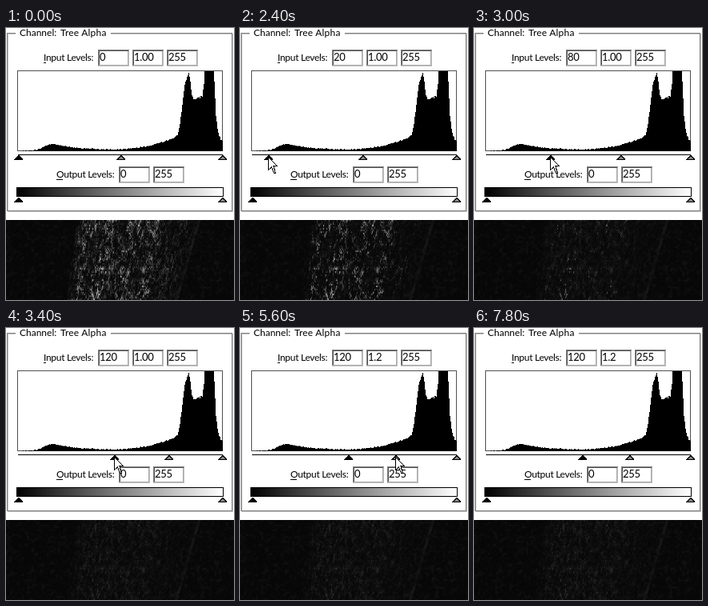
These frames come from a looping animation (285 px wide and 340 px high, 9.8 s). An HTML page with a canvas:

```html
<!DOCTYPE html>
<html lang="en">
<head>
<meta charset="utf-8">
<title>Levels</title>
<style>
html, body { margin: 0; width: 285px; height: 340px; overflow: hidden; background: #fff; }
svg { position: absolute; left: 0; top: 0; }
canvas { position: absolute; left: 0; top: 240px; }
text { font: 12px Lato, "Open Sans", sans-serif; fill: #000; }
#fields text { font-size: 13px; letter-spacing: -.3px; }
.crisp { shape-rendering: crispEdges; }
</style>
</head>
<body>
<canvas id="photo" width="285" height="100"></canvas>
<svg id="panel" width="285" height="340" viewBox="0 0 285 340">
  <defs>
    <linearGradient id="ramp"><stop stop-color="#000"/><stop offset="1" stop-color="#fff"/></linearGradient>
  </defs>
  <g class="crisp" fill="none">
    <path d="M12 7.5H2.5V229.5H283.5V7.5H131" stroke="#c0c0c0"/>
    <path d="M12 6.5H1.5V228.5H282.5V6.5H131" stroke="#808080"/>
  </g>
  <text x="17" y="10">Channel:</text>
  <text x="68" y="10" letter-spacing=".2">Tree Alpha</text>
  <text x="47" y="41" letter-spacing="-.3">Input Levels:</text>
  <text x="63" y="187" letter-spacing="-.3">Output Levels:</text>
  <path class="crisp" d="M47 43.5h3M63 189.5h8" stroke="#000"/>
  <g id="fields" class="crisp"></g>
  <g class="crisp">
    <rect x="14.5" y="53.5" width="256" height="100" fill="#fff" stroke="#505050"/>
    <path id="histogram" fill="#000"/>
    <path d="M15 158.5H271" stroke="#000"/>
    <rect x="13.5" y="199.5" width="258" height="11" fill="url(#ramp)" stroke="#000"/>
  </g>
  <g id="sliders" class="crisp"></g>
  <path id="cursor" class="crisp" d="M.5 .5V16.5L4.5 13 7.5 20.5H9.5L6.8 11.5H11.5Z" fill="#fff" stroke="#000"/>
</svg>
<script>
const LOOP = 9800;
const $ = id => document.getElementById(id);

function add(parent, tag, attrs, text) {
  const el = document.createElementNS('http://www.w3.org/2000/svg', tag);
  for (const k in attrs) el.setAttribute(k, attrs[k]);
  if (text) el.textContent = text;
  parent.append(el);
  return el;
}

function field(x, y, value) {
  const g = $('fields');
  const line = (d, stroke) => add(g, 'path', { d, stroke, fill: 'none' });
  add(g, 'rect', { x, y, width: 39, height: 21, fill: '#fff' });
  line(`M${x} ${y + 20.5}h38.5v-20.5`, '#c0c0c0');
  line(`M${x + 1} ${y + 19.5}h36.5v-18.5`, '#a8a8a8');
  line(`M${x + .5} ${y + 20}v-19.5h38`, '#808080');
  line(`M${x + 1.5} ${y + 19}v-17.5h36`, '#505050');
  return add(g, 'text', { x: x + 2, y: y + 14 }, value);
}

function slider(x, y, gray) {
  const g = add($('sliders'), 'g', { transform: `translate(${x} ${y})` });
  add(g, 'path', { d: 'M0 0h1l5 5v1h-11v-1z', fill: '#000' });
  if (gray) add(g, 'path', { d: 'M0 2h1l3 3h-7z', fill: '#888' });
  return nx => g.setAttribute('transform', `translate(${nx} ${y})`);
}

const lowText = field(115, 27, '0');
const gammaText = field(158, 27, '1.00');
field(201, 27, '255');
field(141, 173, '0');
field(184, 173, '255');

const moveLow = slider(15, 159, false);
const moveMid = slider(143, 159, true);
slider(270, 159, true);
slider(15, 212, false);
slider(270, 212, true);

// Repeatable noise
function hash(x, y, seed = 0) {
  let h = Math.imul(x + 911, 374761393) ^ Math.imul(y + 577, 668265263) ^ Math.imul(seed + 31, 1274126177);
  h = Math.imul(h ^ (h >>> 13), 1274126177);
  h = Math.imul(h ^ (h >>> 15), 2246822519);
  return ((h ^ (h >>> 16)) >>> 0) / 4294967296;
}

function smooth(x, y, seed) {
  const i = Math.floor(x), j = Math.floor(y), u = x - i, v = y - j;
  const row = k => hash(i, k, seed) * (1 - u) + hash(i + 1, k, seed) * u;
  return row(j) * (1 - v) + row(j + 1) * v;
}

// Histogram outline as [x, height]
const curve = [[15, 0], [35, 1], [42, 3], [50, 7], [57, 9], [65, 8], [75, 6], [90, 4], [110, 3],
  [140, 2], [160, 4], [175, 6], [190, 10], [200, 13], [208, 16], [214, 20], [217, 33], [219, 50],
  [221, 68], [223, 82], [226, 93], [228, 98], [230, 86], [232, 70], [234, 65], [240, 67], [245, 68],
  [247, 85], [248, 100], [259, 100], [260, 88], [261, 66], [262, 44], [264, 27], [266, 19], [268, 15], [271, 13]];
let bars = '';
for (let x = 15, i = 0; x < 271; x++) {
  while (curve[i + 1][0] < x) i++;
  const [x0, h0] = curve[i], [x1, h1] = curve[i + 1];
  const h = h0 + (h1 - h0) * (x - x0) / (x1 - x0);
  const rough = x < 212 ? 1.2 : 3;
  const top = Math.max(0, Math.min(100, Math.round(h + (h < 99 ? (hash(x, 3) - .5) * rough : 0))));
  if (top) bars += `M${x} 154v-${top}h1v${top}z`;
}
$('histogram').setAttribute('d', bars);

// Bark: a dark base plus highlights that the black point cuts away
const W = 285, H = 100;
const base = new Float32Array(W * H), light = new Float32Array(W * H);
for (let y = 0; y < H; y++) {
  const left = 88 - y * .13, right = 243 - y * .29;
  for (let x = 0; x < W; x++) {
    const k = y * W + x;
    const u = (x - left) / (right - left);
    base[k] = 5 + hash(x, y) * 4 + smooth(x / 3, y / 3, 1) ** 4 * 12;
    if (u < 0 || u > 1) continue;
    const grain = smooth(u * 72, y / 5, 2) * .55 + hash(x, y >> 1, 3) * .45;
    const band = .6 + .25 * Math.sin(u * 31 - .4) + .15 * Math.sin(u * 13 + y * .06);
    const fade = u < .6 ? 1 : Math.max(.25, 1 - (u - .6) * 2.4);
    const edge = Math.min(1, u * 7 + .2);
    base[k] += grain ** 3 * 36 * fade * edge;
    if (u > .975) base[k] += smooth(4, y / 4, 5) * 14;
    light[k] = Math.min(128, Math.max(0, grain - .3) ** 2 * 480 * band * fade * edge);
  }
}

const ctx = $('photo').getContext('2d');
const image = ctx.createImageData(W, H);
function paintPhoto(low) {
  for (let k = 0; k < W * H; k++) {
    const v = base[k] + Math.max(0, light[k] - low);
    image.data.set([v, v, v, 255], k * 4);
  }
  ctx.putImageData(image, 0, 0);
}

const steps = (t, start, count, gap) =>
  Math.max(0, Math.min(count, Math.floor((t - start) / gap) + 1));

let shown = -1;
function draw(t) {
  const low = steps(t, 2400, 6, 200) * 20;
  const eased = t >= 5600;
  if (low !== shown) {
    shown = low;
    lowText.textContent = low;
    moveLow(15 + low);
    paintPhoto(low);
  }
  gammaText.textContent = eased ? '1.2' : '1.00';
  moveMid(eased ? 194 : 143 + low / 2);

  const x = eased ? 194 : t >= 4600 ? 203 : t >= 4400 ? 171 : 15 + low;
  const alpha = steps(t, 1000, 5, 100) / 5 - steps(t, 7600, 3, 100) / 3;
  $('cursor').setAttribute('transform', `translate(${x} 161)`);
  $('cursor').setAttribute('opacity', Math.max(0, alpha));
}

const start = performance.now();
function tick() {
  draw((performance.now() - start) % LOOP);
  requestAnimationFrame(tick);
}
tick();
</script>
</body>
</html>
```
